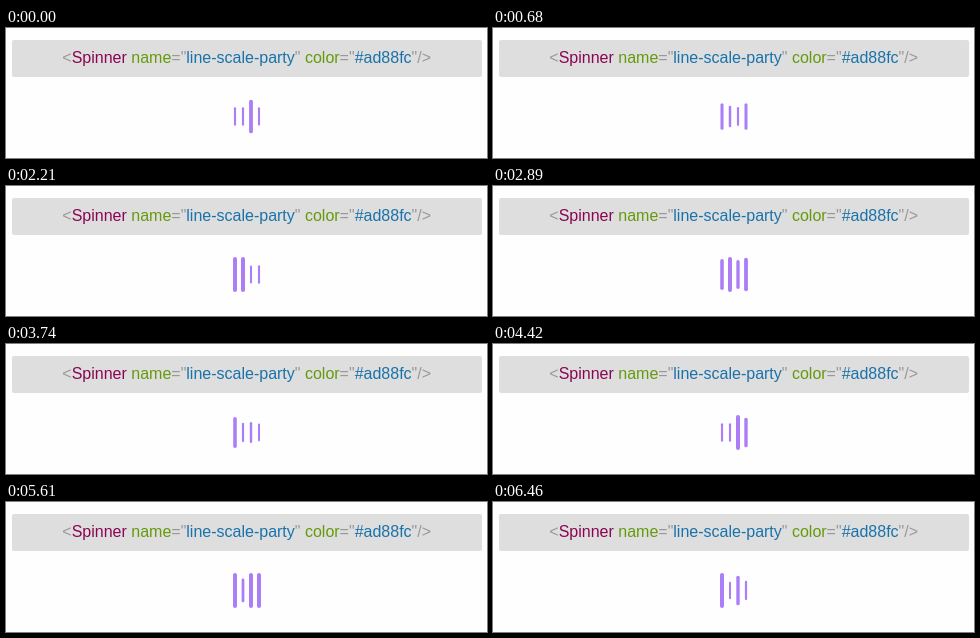
These frames come from a looping animation (481 by 130 pixels, 6630 ms). An HTML page:

```html
<!DOCTYPE html>
<html lang="en">
<head>
<meta charset="utf-8">
<title>line-scale-party</title>
<style>
  html, body { margin: 0; width: 100%; height: 100%; overflow: hidden; background: #fefefe; }
  svg { display: block; width: 481px; height: 130px; }
  text { font: 16px "Liberation Sans", Arial, sans-serif; white-space: pre; fill: #999; }
  .tag { fill: #8a0553; }
  .attr { fill: #669a0c; }
  .value { fill: #1a72ab; }
  #bars { fill: #ab7ef8; }
</style>
</head>
<body>
<svg viewBox="0 0 481 130">
  <rect width="481" height="130" fill="#fefefe"/>
  <rect x="6" y="12" width="470" height="37" rx="2" fill="#dddedd"/>
  <text x="56.3" y="35">&lt;<tspan class="tag">Spinner</tspan> <tspan class="attr">name</tspan>="<tspan class="value">line-scale-party</tspan>" <tspan class="attr">color</tspan>="<tspan class="value">#ad88fc</tspan>"/&gt;</text>
  <g id="bars"></g>
</svg>
<script>
const STEP = 170, LOOP = 6630, CENTER_Y = 88.5;

// period in ms and starting phase of each bar
const BARS = [
  { x: 229, period: 850, phase: 0.34 },
  { x: 237, period: 649, phase: 0.54 },
  { x: 245, period: 397, phase: 0.83 },
  { x: 253, period: 530, phase: 0.365 }
];

const group = document.getElementById('bars');
for (const bar of BARS) {
  bar.node = document.createElementNS('http://www.w3.org/2000/svg', 'rect');
  const box = { x: -2, y: -17.5, width: 4, height: 35, rx: 2 };
  for (const key in box) bar.node.setAttribute(key, box[key]);
  group.appendChild(bar.node);
}

const bezier = (a, b, t) => 3 * a * t * (1 - t) ** 2 + 3 * b * t * t * (1 - t) + t ** 3;

// CSS "ease": cubic-bezier(.25, .1, .25, 1)
function ease(x) {
  let lo = 0, hi = 1;
  for (let i = 0; i < 24; i++) {
    const mid = (lo + hi) / 2;
    if (bezier(0.25, 0.25, mid) < x) lo = mid; else hi = mid;
  }
  return bezier(0.1, 1, lo);
}

// shrinks to half, then grows back, each half eased
const scaleAt = p => p < 0.5 ? 1 - ease(p * 2) / 2 : 0.5 + ease(p * 2 - 1) / 2;

function draw(ms) {
  const t = Math.floor((ms % LOOP) / STEP) * STEP;
  for (const { x, period, phase, node } of BARS) {
    const s = scaleAt((phase + t / period) % 1);
    node.setAttribute('transform', `translate(${x} ${CENTER_Y}) scale(${s.toFixed(4)})`);
  }
}

const start = performance.now();
function tick() {
  draw(performance.now() - start);
  requestAnimationFrame(tick);
}
tick();
</script>
</body>
</html>
```
